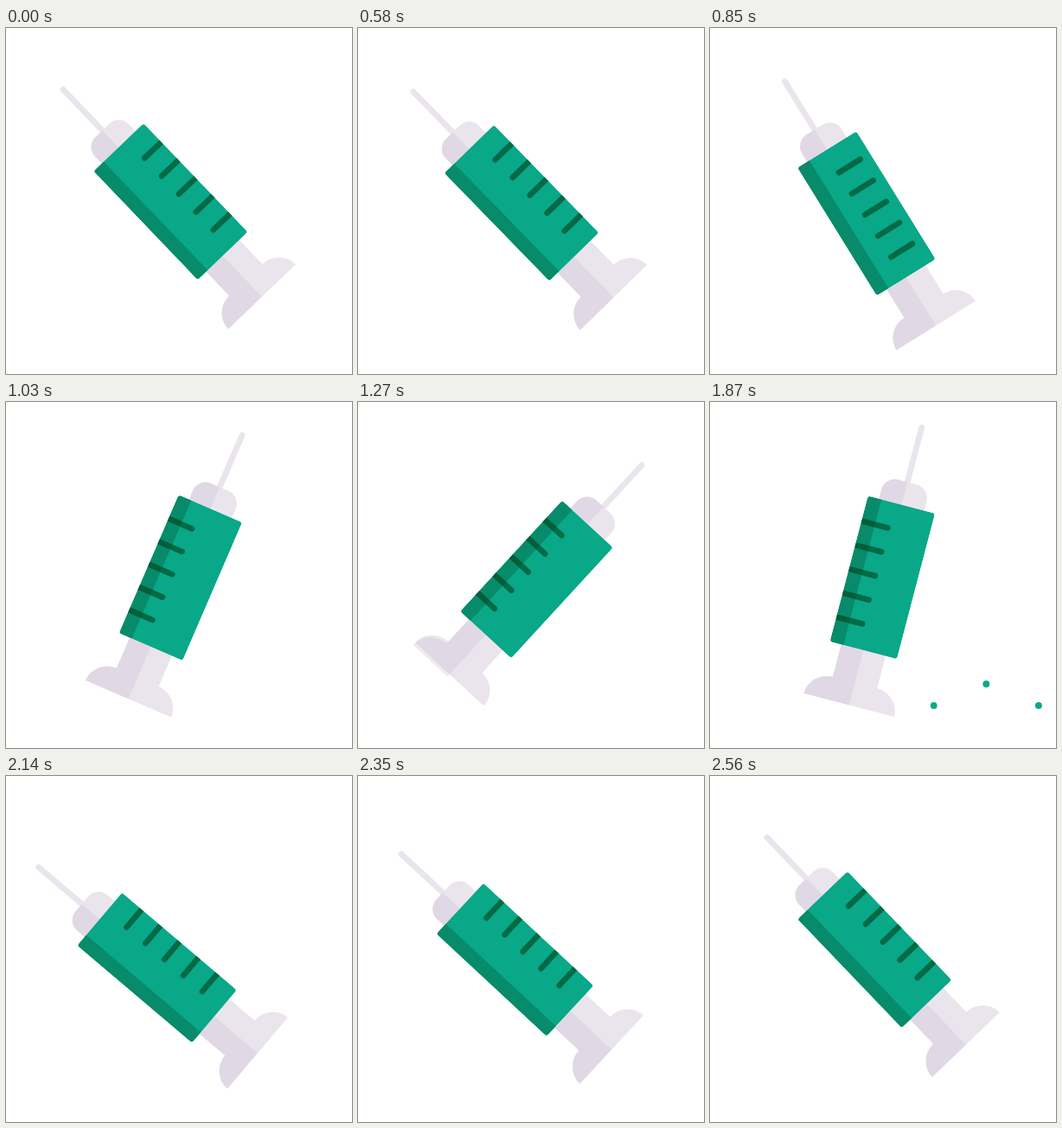
Recreate the animation shown at these times as an HTML page. Size 400 by 400 pixels, loop 2.59 s.

```html
<!DOCTYPE html>
<html lang="en">
<head>
<meta charset="utf-8">
<title>Syringe</title>
<style>
  html, body { margin: 0; width: 100%; height: 100%; overflow: hidden; background: #fff; }
  svg { display: block; width: 100%; height: 100%; }
  .pale { fill: #eae5ec; }
  .shade { fill: #c8b9d2; fill-opacity: .3; }
  .green { fill: #08a888; }
</style>
</head>
<body>
<svg viewBox="0 0 400 400">
  <defs>
    <clipPath id="barrel"><rect x="-40" y="-87" width="80" height="174" rx="3.5"/></clipPath>
  </defs>
  <g id="syringe">
    <path d="M0-179.5V-110" stroke="#eae5ec" stroke-width="6.8" stroke-linecap="round"/>
    <path class="pale" d="M-27-80V-98a16 16 0 0 1 16-16H11a16 16 0 0 1 16 16V-80z"/>
    <path class="shade" d="M-27-80V-98a16 16 0 0 1 16-16H0V-80z"/>
    <path id="plunger" class="pale" d="M-26.5 70V125.5a27.5 27 0 0 0-27.5 27H54a27.5 27 0 0 0-27.5-27V70z"/>
    <path class="shade" d="M-26.5 70V125.5a27.5 27 0 0 0-27.5 27H0V70z"/>
    <g clip-path="url(#barrel)">
      <rect class="green" x="-40" y="-87" width="80" height="174"/>
      <rect x="-40" y="-87" width="16" height="174" fill="#078b6a"/>
      <path id="ticks" fill="none" stroke="#003c14" stroke-opacity=".57" stroke-width="6.6" stroke-linecap="round"/>
    </g>
  </g>
  <path id="drop" class="green" d="M0-64.5C5-51 13.3-30 13.3-14.5C13.3-4 7 .3 0 .3S-13.3-4-13.3-14.5C-13.3-30-5-51 0-64.5z"/>
  <g id="splash" class="green"><circle/><circle/><circle/></g>
</svg>
<script>
  const LOOP = 2590, START = 580, STEP = 30;
  const [syringe, plunger, ticks, drop, splash] =
    ['syringe', 'plunger', 'ticks', 'drop', 'splash'].map(id => document.getElementById(id));

  ticks.setAttribute('d', [-2, -1, 0, 1, 2].map(i => `M-14.5 ${i * 28.7 + 0.3}h29`).join(''));

  const place = (el, value) => el.setAttribute('transform', value);
  const show = (el, on) => el.setAttribute('visibility', on ? 'visible' : 'hidden');

  function draw(t) {
    const ease = (from, to) => {
      const k = Math.min(1, Math.max(0, (t - from) / (to - from)));
      return k * k * (3 - 2 * k);
    };

    // Wind up, swing over, swing back, settle.
    const wind = ease(550, 730) - ease(2170, 2560);
    const swing = ease(730, 1155) - ease(1713, 2143);
    const roll = ease(730, 1075) - ease(1812, 2150);
    const push = ease(1200, 1400) - ease(1720, 1860);
    const x = 200.7 - 14.7 * wind + 10.4 * roll;
    const y = 211.5 + 19.9 * wind - 15.2 * roll;
    const angle = -43.8 - 5.9 * wind + 92.3 * swing;
    place(syringe, `translate(${x} ${y}) rotate(${angle}) translate(0 -15)`);
    place(ticks, `translate(${27.5 - 55 * roll})`);
    place(plunger, `translate(0 ${-12.5 * push})`);

    // The drop grows while it falls.
    const fall = (t - 1300) / 270;
    show(drop, fall > 0 && t < 1675);
    if (fall > 0) {
      const bottom = Math.min(388, 80 + 197 * fall ** 1.85);
      place(drop, `translate(${328 - 6 * Math.min(1, fall)} ${bottom}) scale(${Math.min(1.23, fall)})`);
    }

    const burst = (t - 1675) / 235;
    const bursting = burst > 0 && burst < 1;
    show(splash, bursting);
    if (bursting) [...splash.children].forEach((dot, i) => {
      dot.setAttribute('cx', 319.3 + (i - 1) * 73 * burst);
      dot.setAttribute('cy', 375 - (i === 1 ? 59 : 29) * burst);
      dot.setAttribute('r', 9.5 * Math.sqrt(1 - burst));
    });
  }

  function frame() {
    const t = performance.now() % LOOP;
    draw(t < START ? 0 : START + Math.floor((t - START) / STEP) * STEP);
    requestAnimationFrame(frame);
  }
  frame();
</script>
</body>
</html>
```
